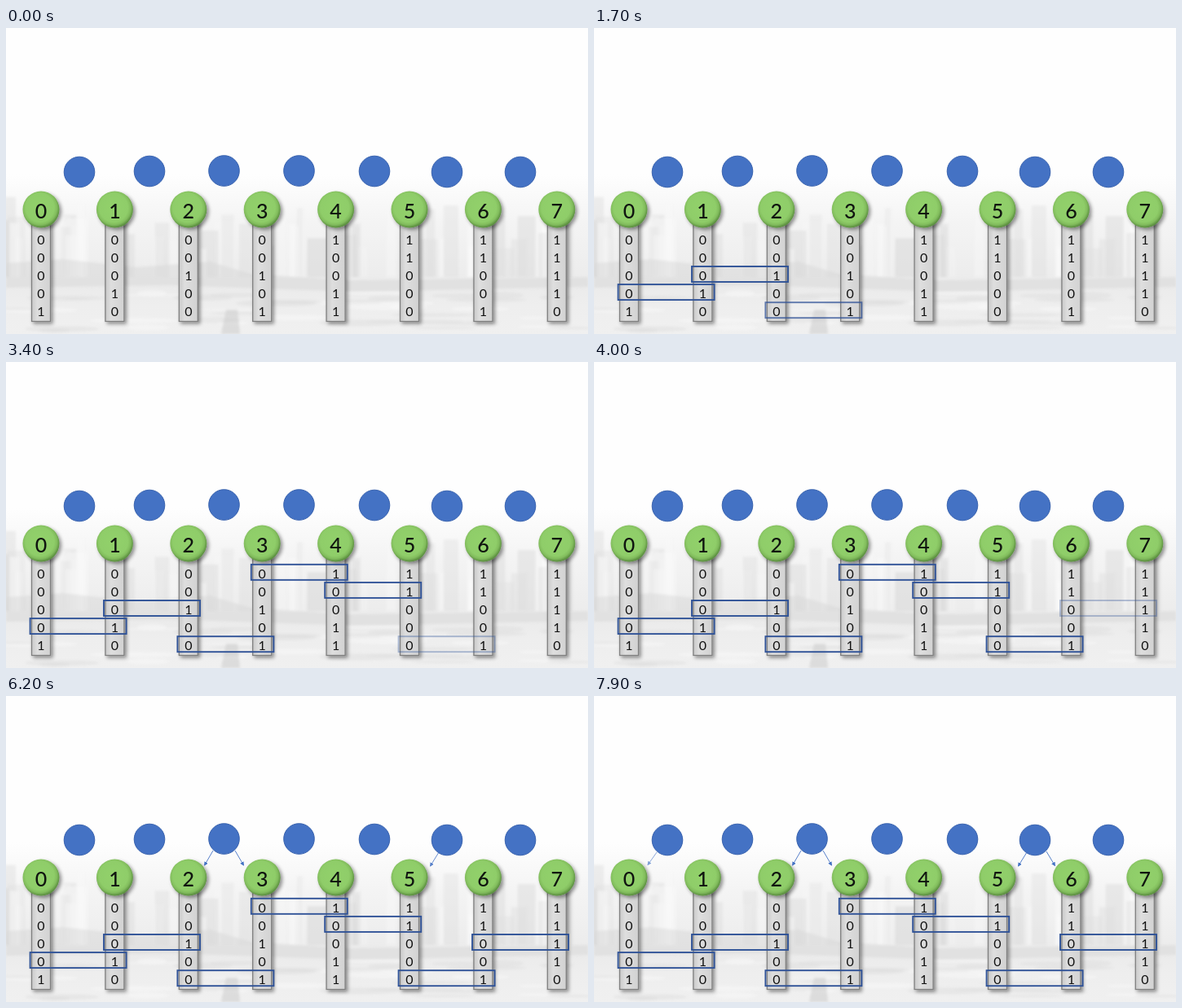
Write an HTML page that moves like this. It is 714 by 376 pixels and loops after 8000 ms.

```html
<!DOCTYPE html>
<html lang="en">
<head>
<meta charset="utf-8">
<style>
  html, body { margin: 0; width: 100%; height: 100%; overflow: hidden; background: #fefefe; }
  svg { display: block; width: 714px; height: 376px; }
  text { font-family: Lato, "Open Sans", sans-serif; text-anchor: middle; }
</style>
</head>
<body>
<svg id="stage" viewBox="0 0 714 376">
  <defs>
    <linearGradient id="haze" x1="0" y1="0" x2="0" y2="1">
      <stop offset="0" stop-color="#fefefe"/>
      <stop offset=".3" stop-color="#f4f4f4"/>
      <stop offset=".7" stop-color="#ebebeb"/>
      <stop offset=".82" stop-color="#eeeeee"/>
      <stop offset="1" stop-color="#f0f0f0"/>
    </linearGradient>
    <linearGradient id="bar">
      <stop offset="0" stop-color="#c9c9c9"/>
      <stop offset=".3" stop-color="#dedede"/>
      <stop offset="1" stop-color="#d2d2d2"/>
    </linearGradient>
    <radialGradient id="ball" cx=".47" cy=".45" r=".54">
      <stop offset="0" stop-color="#92d16c"/>
      <stop offset=".72" stop-color="#8fcd69"/>
      <stop offset=".86" stop-color="#82bd5d"/>
      <stop offset="1" stop-color="#5c8f41"/>
    </radialGradient>
    <filter id="soft"><feGaussianBlur stdDeviation="1.6"/></filter>
    <filter id="shadow" x="-40%" y="-20%" width="200%" height="150%">
      <feDropShadow dx="2.5" dy="2.5" stdDeviation="2" flood-opacity=".42"/>
    </filter>
    <marker id="tip" viewBox="0 0 6 6" refX="5" refY="3" markerWidth="5" markerHeight="5"
            markerUnits="userSpaceOnUse" orient="auto">
      <path d="M0 0L6 3L0 6z" fill="#4472c4"/>
    </marker>
  </defs>
  <rect y="180" width="714" height="196" fill="url(#haze)"/>
</svg>
<script>
const stage = document.getElementById('stage');
const LOOP = 8000;
const columnX = i => 43 + 90.4 * i;

function add(parent, tag, attrs, text) {
  const node = document.createElementNS('http://www.w3.org/2000/svg', tag);
  for (const key in attrs) node.setAttribute(key, attrs[key]);
  if (text !== undefined) node.textContent = text;
  return parent.appendChild(node);
}

// Faint skyline, shore and water
let seed = 11;
const random = () => (seed = seed * 16807 % 2147483647) / 2147483647;
const city = add(stage, 'g', { filter: 'url(#soft)' });
for (let i = 0; i < 62; i++) {
  const x = random() * 720 - 8, top = 207 + random() * 65;
  add(city, 'rect', {
    x, y: top, width: 6 + random() * 18, height: 306 - top,
    fill: random() < .55 ? '#d9d9d9' : '#f8f8f8', opacity: .25 + random() * .3
  });
}
add(city, 'path', {
  d: 'M0 289L70 284L160 294L250 287L300 302L420 310L714 306V318L430 324L200 316L0 319z',
  fill: '#d5d5d5', opacity: .45
});
for (let i = 0; i < 40; i++) {
  add(city, 'ellipse', {
    cx: random() * 714, cy: 325 + random() * 48, rx: 15 + random() * 45, ry: 1 + random() * 3,
    fill: random() < .5 ? '#dddddd' : '#fafafa', opacity: .5
  });
}
add(city, 'path', { d: 'M264 376L270 346H284L287 376z', fill: '#cfcfcf', opacity: .6 });

// Numbered columns
const codes = ['00001', '00010', '00100', '00101', '10011', '11000', '11001', '11110'];
codes.forEach((code, i) => {
  const x = columnX(i);
  add(stage, 'rect', {
    x: x - 11.5, y: 235, width: 23, height: 125.5,
    fill: 'url(#bar)', stroke: '#7f7f7f', 'stroke-width': 1.3, filter: 'url(#shadow)'
  });
  add(stage, 'circle', { cx: x, cy: 223, r: 22.5, fill: 'url(#ball)', filter: 'url(#shadow)' });
  add(stage, 'text', { x, y: 233.5, 'font-size': 25, 'font-weight': 500, fill: '#101510' }, i);
  [...code].forEach((bit, row) =>
    add(stage, 'text', { x, y: 266.3 + 21.9 * row, 'font-size': 16, fill: '#111' }, bit));
});

// Blue nodes
[[90, 177], [176, 176], [267.5, 175.5], [359.5, 175.5], [452, 176], [541, 177], [631, 177]]
  .forEach(([cx, cy]) =>
    add(stage, 'circle', { cx, cy, r: 18.8, fill: '#4472c4', stroke: '#3761ad', 'stroke-width': 1 }));

// Parts that fade in one after another
const fades = [];
const fadeIn = (start, duration, node) => fades.push({ start, duration, node });

const boxRow = [3, 2, 4, 0, 1, 4, 2];
const boxTiming = [[200, 200], [850, 50], [1400, 400], [2050, 450], [2800, 400], [3250, 400], [3850, 450]];
boxRow.forEach((row, i) => fadeIn(...boxTiming[i], add(stage, 'rect', {
  x: 29.6 + 90.4 * i, y: 248.8 + 22.1 * row, width: 118, height: 19,
  fill: 'none', stroke: '#2f5297', 'stroke-width': 1.9
})));

[
  [4600, 'M254 190L243.5 208'],
  [5250, 'M281 190L291.5 208'],
  [5800, 'M531 192L520.5 209'],
  [6400, 'M555 191L565.5 208.5'],
  [7600, 'M77 192L66 207.5']
].forEach(([start, d]) => fadeIn(start, 450, add(stage, 'path', {
  d, fill: 'none', stroke: '#4472c4', 'stroke-width': .9, 'marker-end': 'url(#tip)'
})));

function draw(now) {
  const time = now % LOOP;
  for (const { start, duration, node } of fades) {
    node.setAttribute('opacity', Math.min(1, Math.max(0, (time - start) / duration)));
  }
  requestAnimationFrame(draw);
}
draw(0);
</script>
</body>
</html>
```
